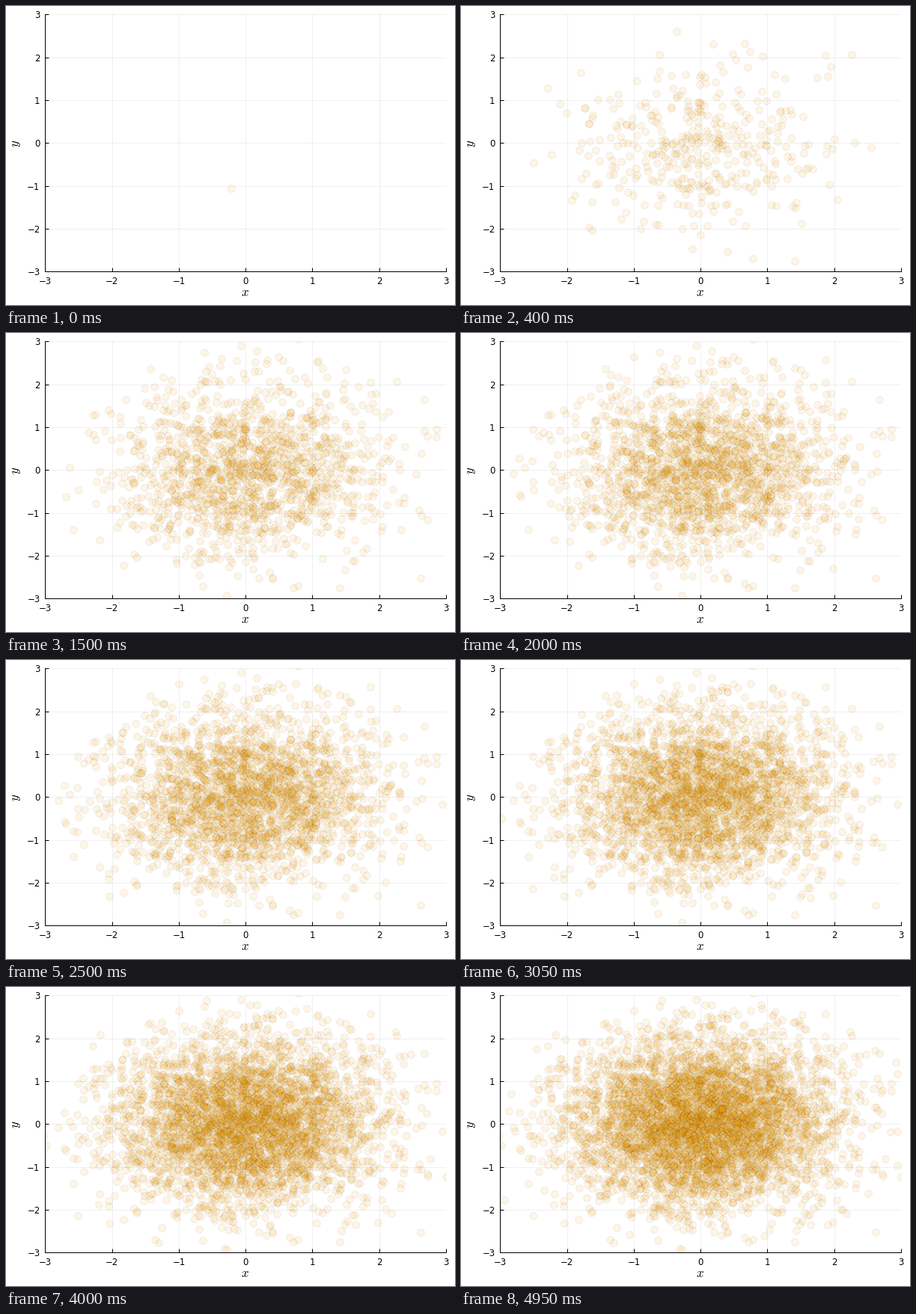
Animation, 600 px wide and 400 px high, one loop 5 s. Source, as a matplotlib script:

```python
import numpy as np
import matplotlib.pyplot as plt
from matplotlib.animation import FuncAnimation

W, H, DPI = 600, 400, 100
LEFT, RIGHT, TOP, BOTTOM = 52.4, 588, 11.4, 355.4
FRAMES, STEP = 100, 50
LIMIT = 3
START = (-0.22, -1.05)
CENTRE = (0.02, 0.07)


def pt(px):
    return px * 72 / DPI


plt.rcParams.update({"font.family": "DejaVu Sans", "mathtext.fontset": "cm"})
fig = plt.figure(figsize=(W / DPI, H / DPI), dpi=DPI, facecolor="white")
ax = fig.add_axes([LEFT / W, 1 - BOTTOM / H,
                   (RIGHT - LEFT) / W, (BOTTOM - TOP) / H])
ticks = range(-LIMIT, LIMIT + 1)
ax.set(xlim=(-LIMIT, LIMIT), ylim=(-LIMIT, LIMIT), xticks=ticks, yticks=ticks)
ax.set_axisbelow(True)
ax.grid(color="black", alpha=0.06, linewidth=pt(1))
ax.tick_params(direction="in", length=pt(5), width=pt(1), labelsize=pt(11.6))
ax.tick_params(axis="x", pad=pt(6.4))
ax.tick_params(axis="y", pad=pt(7))
ax.spines[["top", "right"]].set_visible(False)
ax.spines[["left", "bottom"]].set_linewidth(pt(1))
for label, x, y, angle in (("$x$", 319.7, 383.5, 0), ("$y$", 12.7, 183.5, 90)):
    fig.text(x / W, 1 - y / H, label, fontsize=pt(17), rotation=angle,
             ha="center", va="center")

# Standard normal samples, fifty more in every frame.
rng = np.random.default_rng(7)
samples = rng.normal(CENTRE, 1, (1 + STEP * (FRAMES - 1), 2))
samples[0] = START

dots, = ax.plot([], [], "o", markersize=pt(9.6), markeredgewidth=pt(0.6),
                markerfacecolor=(1, 165 / 255, 0, 0.1),
                markeredgecolor=(0, 0, 0, 0.1))


def draw(frame):
    dots.set_data(*samples[:1 + STEP * frame].T)
    return dots,


anim = FuncAnimation(fig, draw, frames=FRAMES, interval=50,
                     init_func=lambda: draw(0), repeat=True, repeat_delay=0)
plt.show()
```
